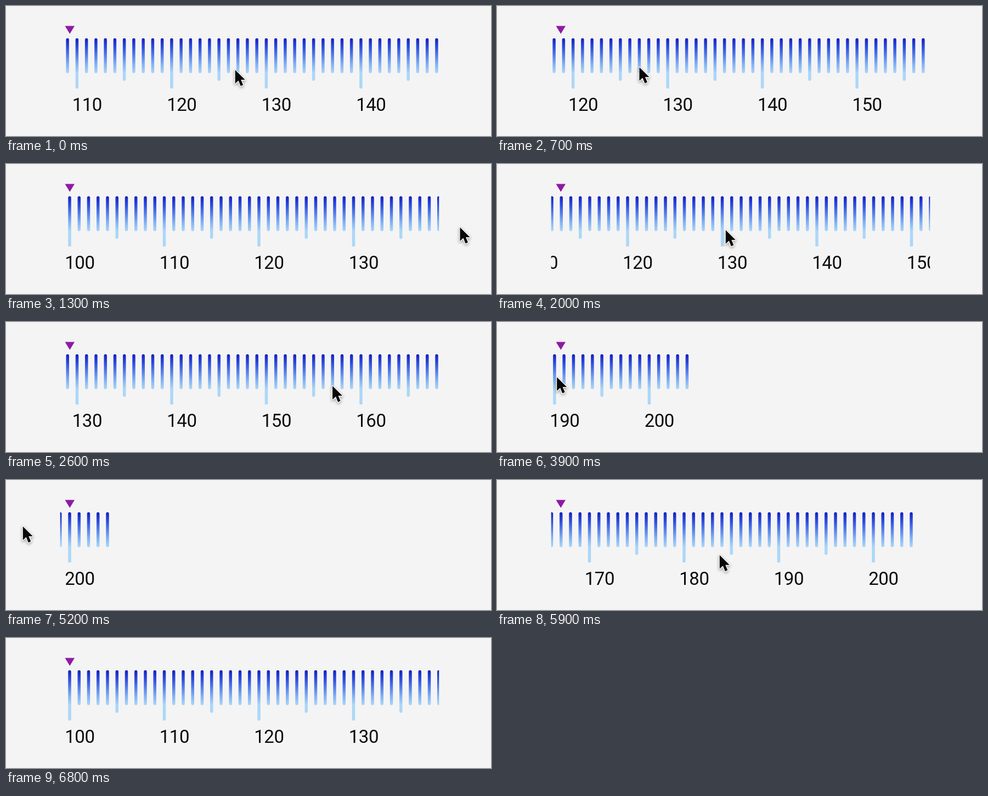
An HTML page with a canvas for the animation above (6900 ms loop, 884 px wide and 238 px high).

```html
<!DOCTYPE html>
<html lang="en">
<head>
<meta charset="utf-8">
<title>Ruler picker</title>
<style>
html, body { margin: 0; width: 100%; height: 100%; overflow: hidden; background: #f4f4f4; }
canvas { display: block; }
</style>
</head>
<body>
<canvas id="stage" width="884" height="238"></canvas>
<script>
const ctx = document.getElementById('stage').getContext('2d');
const LOOP = 6900, STEP = 100, HIDE = 6800;
const GAP = 17.25, ORIGIN = 116, MIN = 100, MAX = 200, LAST = 204;
const LEFT = 98.7, RIGHT = 789.3, TOP = 59;

// Each drag: start time, start x, end time, end x
const drags = [
  [-200, 576, 300, 124],
  [510, 129, 1210, 845],
  [1700, 639, 2350, 135],
  [2650, 631, 3200, 109],
  [3500, 646, 4000, 46],
  [4350, 365, 4850, 150],
  [5200, 30, 5300, 30],
  [5500, 130, 5800, 700],
  [6000, 110, 6300, 740],
  [6450, 130, 6720, 660]
];
const xPath = drags.flatMap(([t0, x0, t1, x1]) => [[t0, x0], [t1, x1]]);
const yPath = [[0, 116], [700, 111], [2000, 120], [3100, 113], [3900, 100], [5250, 84], [6400, 172], [LOOP, 150]];

const clamp = (n, lo, hi) => Math.min(hi, Math.max(lo, n));

function ease([t0, a], [t1, b], t) {
  const u = clamp((t - t0) / (t1 - t0), 0, 1);
  return a + (b - a) * u * u * (3 - 2 * u);
}

function along(path, t) {
  const i = path.findIndex(p => p[0] > t);
  return i < 0 ? path.at(-1)[1] : ease(path[i - 1], path[i], t);
}

// The ruler follows the pointer one to one while it is dragged
function rulerValue(t) {
  let value = MIN;
  for (const [t0, x0, t1, x1] of drags) {
    const x = ease([t0, x0], [t1, x1], t);
    value = clamp(value + (x0 - x) / GAP, MIN, MAX);
  }
  return value;
}

const gradient = ctx.createLinearGradient(0, TOP, 0, 123);
['#1420c0', '#2c4cde', '#5580ea', '#84b2f2', '#acd7f8']
  .forEach((color, i) => gradient.addColorStop(i / 4, color));

const arrow = new Path2D('M0 0V25L6 19.5L10 29.5L14.5 27.5L10.5 18H18Z');
const marker = new Path2D('M107.5 36.5H125L116.3 51Z');

function drawRuler(value) {
  ctx.save();
  ctx.beginPath();
  ctx.rect(LEFT, 0, RIGHT - LEFT, 238);
  ctx.clip();
  ctx.font = '33px Roboto, sans-serif';
  ctx.letterSpacing = '-0.5px';
  for (let n = MIN; n <= LAST; n++) {
    const x = ORIGIN + (n - value) * GAP;
    const major = n % 10 === 0, middle = n % 5 === 0;
    const bottom = major ? 151 : middle ? 137 : 123;
    const foot = major ? 1 : 2.7;
    ctx.fillStyle = gradient;
    ctx.beginPath();
    ctx.roundRect(x - 2.75, TOP, 5.5, bottom - TOP, [2.7, 2.7, foot, foot]);
    ctx.fill();
    if (major) {
      ctx.fillStyle = '#0b0b0b';
      ctx.fillText(n, x - 8.7, 192);
    }
  }
  ctx.restore();
}

function drawPointer(x, y) {
  ctx.save();
  ctx.translate(x + 0.8, y + 1);
  ctx.lineWidth = 2.8;
  ctx.lineJoin = 'round';
  ctx.strokeStyle = '#f8f8f8';
  ctx.shadowColor = 'rgba(0,0,0,.4)';
  ctx.shadowBlur = 5;
  ctx.shadowOffsetY = 2;
  ctx.stroke(arrow);
  ctx.shadowColor = 'transparent';
  ctx.fillStyle = '#080808';
  ctx.fill(arrow);
  ctx.restore();
}

function draw(now) {
  const t = Math.floor(now % LOOP / STEP) * STEP;
  ctx.fillStyle = '#f4f4f4';
  ctx.fillRect(0, 0, 884, 238);
  drawRuler(rulerValue(t));
  ctx.fillStyle = '#8e1aa5';
  ctx.fill(marker);
  if (t < HIDE) drawPointer(along(xPath, t), along(yPath, t));
}

const start = performance.now();
function frame() {
  draw(performance.now() - start);
  requestAnimationFrame(frame);
}
frame();
</script>
</body>
</html>
```
